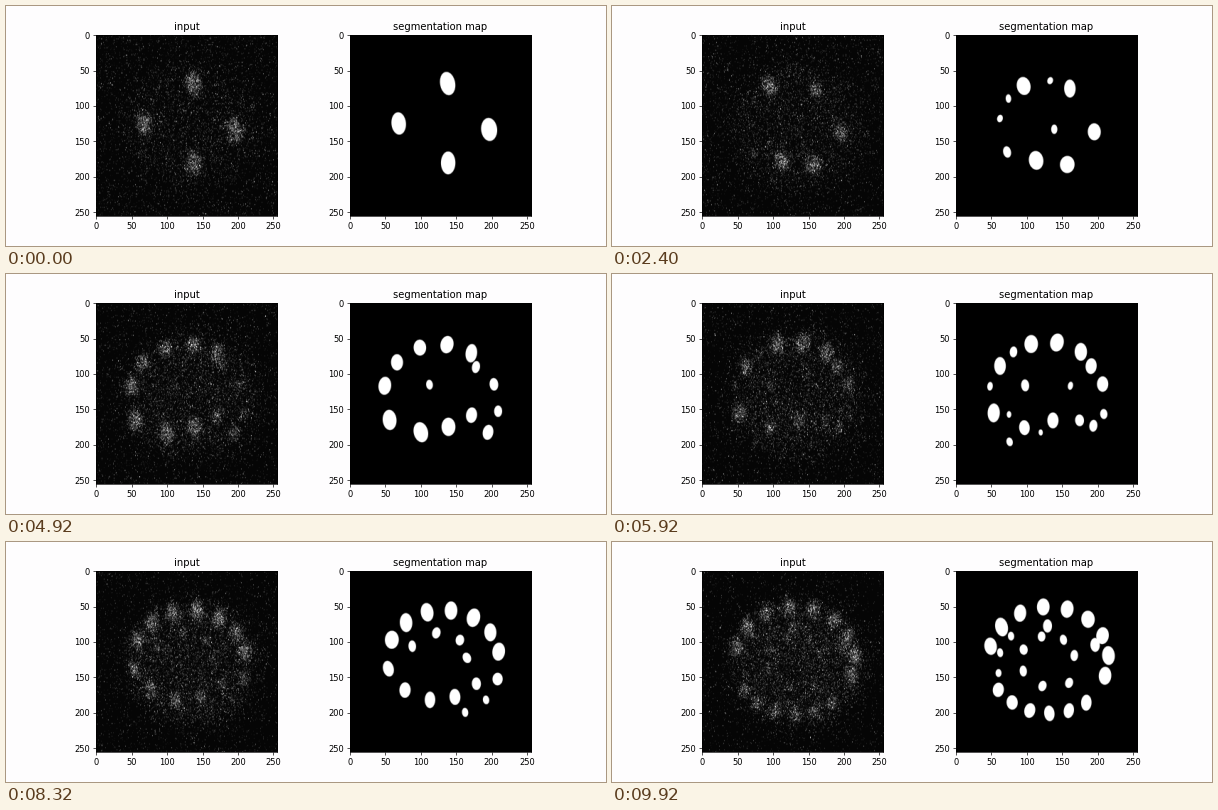
A matplotlib script for the animation above (10 s loop, 600 px wide and 240 px high).

```python
import numpy as np
import matplotlib.pyplot as plt
from matplotlib.animation import FuncAnimation

SIZE = 256
STEPS = 100
TICK = 40  # ms; pictures hold for 3 and 2 ticks in turn
CENTRE, RADII = (132, 125), (80, 70)

# Step -> arcs of evenly spaced nuclei, large ones first:
# count, first and last angle, first and last reach (1 = embryo outline)
STAGES = {
    0: [(4, -9, 275, .8, .8)],
    12: [(2, 67, 125, .7, .92), (3, 247, 335, .6, .95)],
    35: [(3, 217, 290, .95, 1), (2, 298, 364, .15, .72), (5, 62, 174, .85, .9)],
    49: [(3, 211, 276, 1.12, .72), (5, 58, 174, .9, 1.05), (2, 315, 313, .68, 1.13),
         (3, 337, 401, 1.03, .74), (1, 153, 153, .29, .29)],
    68: [(7, 6, 154, 1, 1.03), (2, 196, 235, 1.07, 1.24), (3, 170, 379, .62, .37),
         (3, 212, 258, .85, .85), (3, 308, 332, .85, 1.08)],
    83: [(7, 9, 157, .97, 1), (4, 191, 284, 1, .78), (2, 319, 337, .75, 1.02),
         (4, 155, 4, .62, .4), (2, 289, 312, 1.13, 1.1)],
    99: [(9, -19, 166, 1.02, 1.08), (6, 214, 306, 1.1, 1.08), (2, 20, 94, .84, .67),
         (7, 10, 305, .43, .58), (3, 146, 197, .83, .95)],
}


def lay_out(step, arcs):
    """Rows of x, y, width, height, tilt."""
    rng = np.random.default_rng(step)
    rows = []
    for k, (count, a0, a1, r0, r1) in enumerate(arcs):
        size = (1 - 0.2 * step / STEPS) * (1 - 0.13 * k)
        angle = np.radians(np.linspace(a0, a1, count))
        reach = np.linspace(r0, r1, count)
        rows.append(np.column_stack([
            CENTRE[0] + RADII[0] * reach * np.cos(angle),
            CENTRE[1] - RADII[1] * reach * np.sin(angle),
            22 * size * rng.uniform(0.92, 1.08, count),
            31 * size * rng.uniform(0.92, 1.08, count),
            rng.normal(0, 8, count)]))
    return np.vstack(rows)


def link(a, b, reach=42):
    """Pair nearest nuclei; the rest shrink away or grow in place."""
    dist = np.hypot(*(a[:, None, :2] - b[None, :, :2]).transpose(2, 0, 1))
    empty = np.array([1, 1, 0, 0, 1])
    left, right, pairs = set(range(len(a))), set(range(len(b))), []
    for k in np.argsort(dist, axis=None):
        i, j = divmod(int(k), len(b))
        if dist[i, j] < reach and i in left and j in right:
            pairs.append((a[i], b[j]))
            left.remove(i)
            right.remove(j)
    pairs += [(a[i], a[i] * empty) for i in sorted(left)]
    pairs += [(b[j] * empty, b[j]) for j in sorted(right)]
    return np.array(pairs)


times = list(STAGES)
layouts = [lay_out(*item) for item in STAGES.items()]
links = [link(a, b) for a, b in zip(layouts, layouts[1:])]
yy, xx = np.mgrid[:SIZE, :SIZE].astype(np.float32)
embryo = 1 / (1 + np.exp(12 * (np.hypot((xx - 135) / 92, (yy - 130) / 88) - 1)))


def nuclei(step, rng):
    k = min(np.searchsorted(times, step, side="right") - 1, len(links) - 1)
    s = (step - times[k]) / (times[k + 1] - times[k])
    a, b = links[k][:, 0], links[k][:, 1]
    cells = a + (b - a) * s
    loose = 4 * s * (1 - s)
    cells[:, :2] += loose * rng.normal(0, 0.8, (len(cells), 2))
    cells[:, 2:4] *= 1 + loose * rng.normal(0, 0.04, (len(cells), 2))
    return cells[cells[:, 2:4].min(axis=1) >= 2]


def render(step):
    rng = np.random.default_rng(500 + step)
    t = step / (STEPS - 1)
    mask = np.zeros((SIZE, SIZE), np.float32)
    rate = 0.05 + 0.04 * (1 - t) + (0.12 + 0.22 * t) * embryo
    for x, y, w, h, tilt in nuclei(step, rng):
        # work only in a window around the nucleus
        r = int(max(w, h)) + 3
        box = (slice(max(int(y) - r, 0), int(y) + r + 1),
               slice(max(int(x) - r, 0), int(x) + r + 1))
        dx, dy = xx[box] - x, yy[box] - y
        c, n = np.cos(np.radians(tilt)), np.sin(np.radians(tilt))
        d = np.hypot((dx * c + dy * n) / w, (dx * n - dy * c) / h) * 2
        edge = np.clip((1 - d) * min(w, h) / 2 + 0.5, 0, 1)
        mask[box] = np.maximum(mask[box], edge)
        rate[box] += 1.7 * np.clip(w * h / 500, 0.12, 1) * np.exp(-d ** 3)
    light = rng.gamma(rng.poisson(rate), 44)
    light = 0.6 * light + 0.4 * np.roll(light, 1, axis=0)
    return np.clip(5 + light, 0, 255).astype(np.uint8), (mask * 255).astype(np.uint8)


pictures = [render(step) for step in range(STEPS)]

fig, axes = plt.subplots(1, 2, figsize=(10, 4), dpi=60, facecolor="#fefdfe")
fig.subplots_adjust(bottom=0.125)
views = []
for ax, title, data in zip(axes, ("input", "segmentation map"), pictures[0]):
    views.append(ax.imshow(data, cmap="gray", vmin=0, vmax=255))
    ax.set_title(title)
    ax.set_xticks(range(0, SIZE, 50))
    ax.set_yticks(range(0, SIZE, 50))


def update(n):
    step = n // 5 * 2 + (n % 5 >= 3)
    for view, data in zip(views, pictures[step]):
        view.set_data(data)
    return views


anim = FuncAnimation(fig, update, frames=STEPS * 5 // 2, interval=TICK,
                     repeat=True, repeat_delay=0)
plt.show()
```
